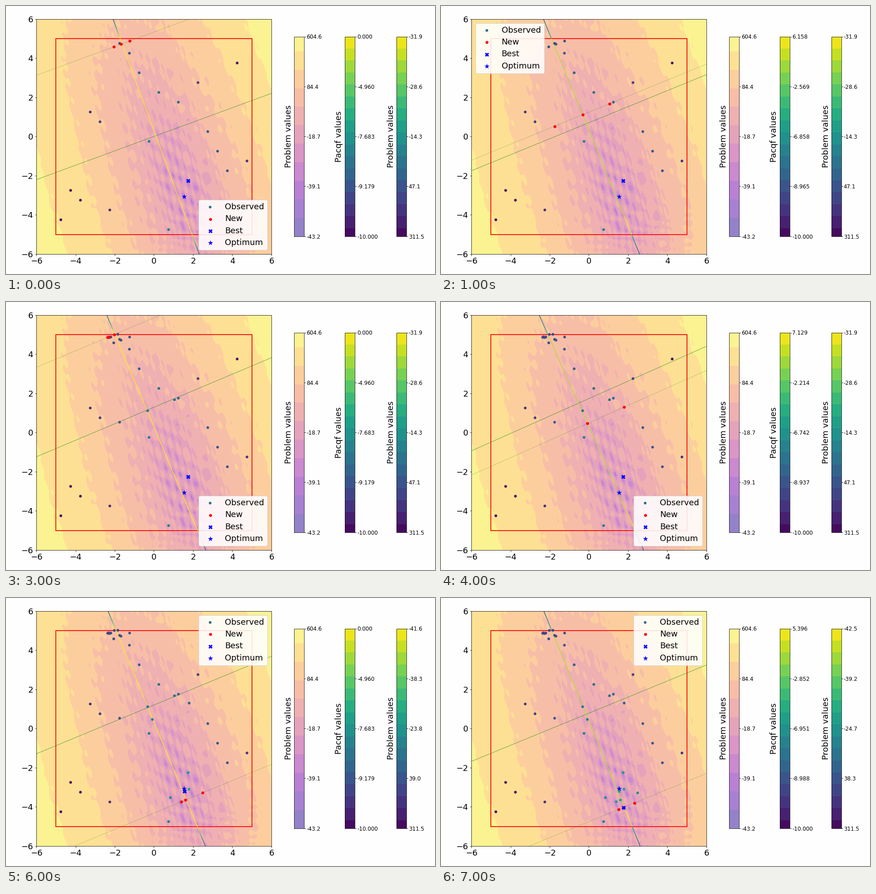
A matplotlib script for the animation above (8 s loop, 947x592 px).

```python
import numpy as np
import matplotlib.pyplot as plt
from matplotlib.animation import FuncAnimation
from matplotlib.collections import LineCollection
from matplotlib.patches import Rectangle

W, H, DPI = 947, 592, 64


def px(n):
    """Pixels to points."""
    return n * 72 / DPI


plt.rcParams.update({
    "font.family": "DejaVu Sans",
    "font.size": px(18),
    "axes.linewidth": px(0.8),
    "patch.linewidth": px(1),
    "xtick.major.size": px(3.5), "ytick.major.size": px(3.5),
    "xtick.major.pad": px(3.5), "ytick.major.pad": px(3.5),
    "xtick.major.width": px(0.8), "ytick.major.width": px(0.8),
})

OPTIMUM = (1.54, -3.07)
AXIS = np.arctan(0.33)      # tilt of the valley
LATTICE = np.radians(20)    # turn of the cosine grid

# Latin hypercube: one point per row and column of a 20 x 20 grid
RANKS = [14, 0, 13, 5, 15, 10, 8, 6, 17, 7, 1, 4, 3, 12, 11, 2, 19, 18, 16, 9]
START = [((k + 10) % 20 / 2 - 4.75, r / 2 - 4.75) for k, r in enumerate(RANKS)]

# each batch lies on one line: height at the first x, then all x
BATCHES = [(4.71, -1.68, -2.05, -1.24), (1.11, -0.32, -1.75, 1.05),
           (4.87, -2.20, -2.27, -1.84), (4.88, -2.31, -2.36, -2.02),
           (0.46, -0.08, 1.80), (-3.10, 1.79, 0.84, 1.55),
           (-3.65, 1.61, 1.40, 2.49), (-3.80, 2.32, 1.51, 1.76)]
START_VALUE = -31.86
RECORDS = {5: -41.6, 7: -42.5}      # batches whose last point is a new best
GAINS = [6.1584, 7.129, 5.396]      # peak of every third acquisition


def valley_coords(x, y):
    """Offsets from the optimum across and down the valley."""
    dx, dy = x - OPTIMUM[0], y - OPTIMUM[1]
    c, s = np.cos(AXIS), np.sin(AXIS)
    return c * dx + s * dy, s * dx - c * dy


def bowl(p):
    across, down = valley_coords(*p)
    return 10 * across ** 2 + down ** 2


def oscillate(t):
    a = np.log(np.maximum(np.abs(t), 1e-9))
    c1 = np.where(t > 0, 10, 5.5)
    c2 = np.where(t > 0, 7.9, 3.1)
    return np.sign(t) * np.exp(a + 0.049 * (np.sin(c1 * a) + np.sin(c2 * a)))


def problem(x, y):
    """Rotated Rastrigin function with its minimum at zero."""
    across, down = (oscillate(t) for t in valley_coords(x, y))
    pos = np.maximum(down, 1e-9)
    down = np.where(down > 0, pos ** (1 + 0.2 * np.sqrt(pos)), down)
    across = across * np.sqrt(10)
    c, s = np.cos(LATTICE), np.sin(LATTICE)
    z1, z2 = c * down - s * across, c * across + s * down
    waves = np.cos(2 * np.pi * z1) + np.cos(2 * np.pi * z2)
    return 10 * (2 - waves) + z1 ** 2 + z2 ** 2


def principal_axis(points):
    """Mean and tilt from a PCA that weighs points by their rank."""
    p = np.array(points)
    rank = np.argsort(np.argsort([bowl(q) for q in points])) + 1
    mean = p.mean(axis=0)
    spread = (p - mean) * np.log(len(p) / rank)[:, None]
    vx, vy = np.linalg.eigh(np.cov(spread.T))[1][:, -1]
    return mean, -vx / vy


def run_search():
    seen, best, low = list(START), min(START, key=bowl), START_VALUE
    steps = []
    for i, (height, *xs) in enumerate(BATCHES):
        mean, slope = principal_axis(seen)
        new = [(x, height + slope * (x - xs[0])) for x in xs]
        if i in RECORDS:
            best, low = new[-1], RECORDS[i]
        gain = GAINS[i // 3] if i % 3 == 1 else 0
        steps.append(dict(seen=seen, new=new, best=best, low=low, mean=mean,
                          slope=slope, gain=gain))
        seen = seen + new
    return steps


STEPS = run_search()

fig = plt.figure(figsize=(W / DPI, H / DPI), dpi=DPI, facecolor="#fefefe")

# pixel canvas for the colour bars
pix = fig.add_axes([0, 0, 1, 1])
pix.set(xlim=(0, W), ylim=(H, 0))
pix.axis("off")

ax = fig.add_axes([67 / W, 44 / H, 519 / W, 519.5 / H])

levels = np.arange(12) * 0.6
plasma = plt.cm.plasma((np.arange(11) + 0.5) / 11)[:, :3]
warm = (1 + plasma) / 2
cool = plt.cm.viridis((np.arange(17) + 0.5) / 17)

grid = np.linspace(-6, 6, 420)
X, Y = np.meshgrid(grid, grid)
field = np.clip(np.log1p(problem(X, Y)), 0.001, 6.59)
ax.contourf(X, Y, field, levels=levels, colors=warm)
ax.add_patch(Rectangle((-5, -5), 10, 10, fill=False, ec="red", lw=px(1.8), zorder=2))
ax.set(xlim=(-6, 6), ylim=(-6, 6), xticks=range(-6, 7, 2), yticks=range(-6, 7, 2))

TOP, BOTTOM, BAR_W = 67.5, 508.5, 22
SPAN = BOTTOM - TOP
BAR_X = [636, 748, 861.7]


def draw_bar(x, edges, colors, label, base):
    for lo, hi, color in zip(edges, edges[1:], colors):
        pix.add_patch(Rectangle((x, hi), BAR_W, lo - hi, color=color, lw=0,
                                antialiased=False))
    pix.add_patch(Rectangle((x, TOP), BAR_W, SPAN, fill=False, ec="black", lw=px(0.8)))
    pix.text(base, 288, label, rotation=90, rotation_mode="anchor",
             ha="center", va="baseline")


def log_ticks(lo, hi):
    return lo + np.expm1(np.linspace(0, 1, 5) * np.log1p(hi - lo))


def draw_ticks(x, values, fmt):
    made = []
    for y, v in zip(np.linspace(BOTTOM, TOP, 5), values):
        made += pix.plot([x + BAR_W, x + BAR_W + 3], [y, y], "k", lw=px(0.8))
        made.append(pix.text(x + BAR_W + 5, y, format(v, fmt), fontsize=px(12),
                             va="center_baseline"))
    return made


warm_edges = np.maximum(BOTTOM - levels / 6.475 * SPAN, TOP)
cool_edges = np.minimum(TOP + 0.06 * SPAN * np.arange(17, -1, -1), BOTTOM)
draw_bar(BAR_X[0], warm_edges, warm, "Problem values", 629)
draw_bar(BAR_X[1], cool_edges, cool, "Pacqf values", 740)
draw_bar(BAR_X[2], cool_edges, cool, "Problem values", 855)
draw_ticks(BAR_X[0], log_ticks(-43.16, 604.6), ".1f")


def point_color(p):
    return plt.cm.viridis(max(1 - np.log(11 + bowl(p)) / 5.85, 0.02))


def axis_level(y, gain):
    """Colour position along the main axis; it falls outside the box."""
    out = np.clip(np.abs(y) - 5, 0, 1)
    if not gain:
        return 1 - 0.75 * out
    inside = 0.88 + 0.11 * np.clip(-y - 3.4, 0, 1)
    return np.where(out > 0, 0.65 - 0.4 * out, inside)


def dots(points, color, label, marker="o", size=6, z=3):
    x, y = zip(*points)
    return ax.scatter(x, y, s=px(size) ** 2, c=color, marker=marker, lw=0,
                      label=label, zorder=z)


live = []


def update(i):
    while live:
        live.pop().remove()

    step = STEPS[i]
    slope, (mx, my) = step["slope"], step["mean"]
    ends = np.array([-6, 6])
    for (x0, y0), alpha in (((mx, my), 0.5), (step["new"][0], 0.22)):
        live.extend(ax.plot(ends, y0 + slope * (ends - x0), color="green",
                            alpha=alpha, lw=px(1.2), zorder=2))

    y = np.linspace(6, -6, 121)
    x = mx + 2.2 / len(step["seen"]) - slope * (y - my)
    path = np.column_stack([x, y])
    colors = plt.cm.viridis(axis_level((y[1:] + y[:-1]) / 2, step["gain"]))
    live.append(ax.add_collection(
        LineCollection(np.stack([path[:-1], path[1:]], axis=1), colors=colors,
                       linewidths=px(1.5), zorder=2.5), autolim=False))

    live.extend([
        dots(step["seen"], [point_color(p) for p in step["seen"]], "Observed"),
        dots(step["new"], "red", "New", size=6.5, z=3.1),
        dots([step["best"]], "blue", "Best", "X", 9, 3.2),
        dots([OPTIMUM], "blue", "Optimum", "*", 12, 3.3),
    ])
    live.append(ax.legend(handles=live[-4:], loc="best", scatterpoints=1,
                          labelspacing=0.46, framealpha=0.88))

    live.extend(draw_ticks(BAR_X[1], log_ticks(-10, step["gain"]), ".3f"))
    live.extend(draw_ticks(BAR_X[2], log_ticks(step["low"], 311.5)[::-1], ".1f"))
    return live


anim = FuncAnimation(fig, update, frames=len(STEPS), interval=1000, repeat=True,
                     repeat_delay=0, blit=False)
plt.show()
```
